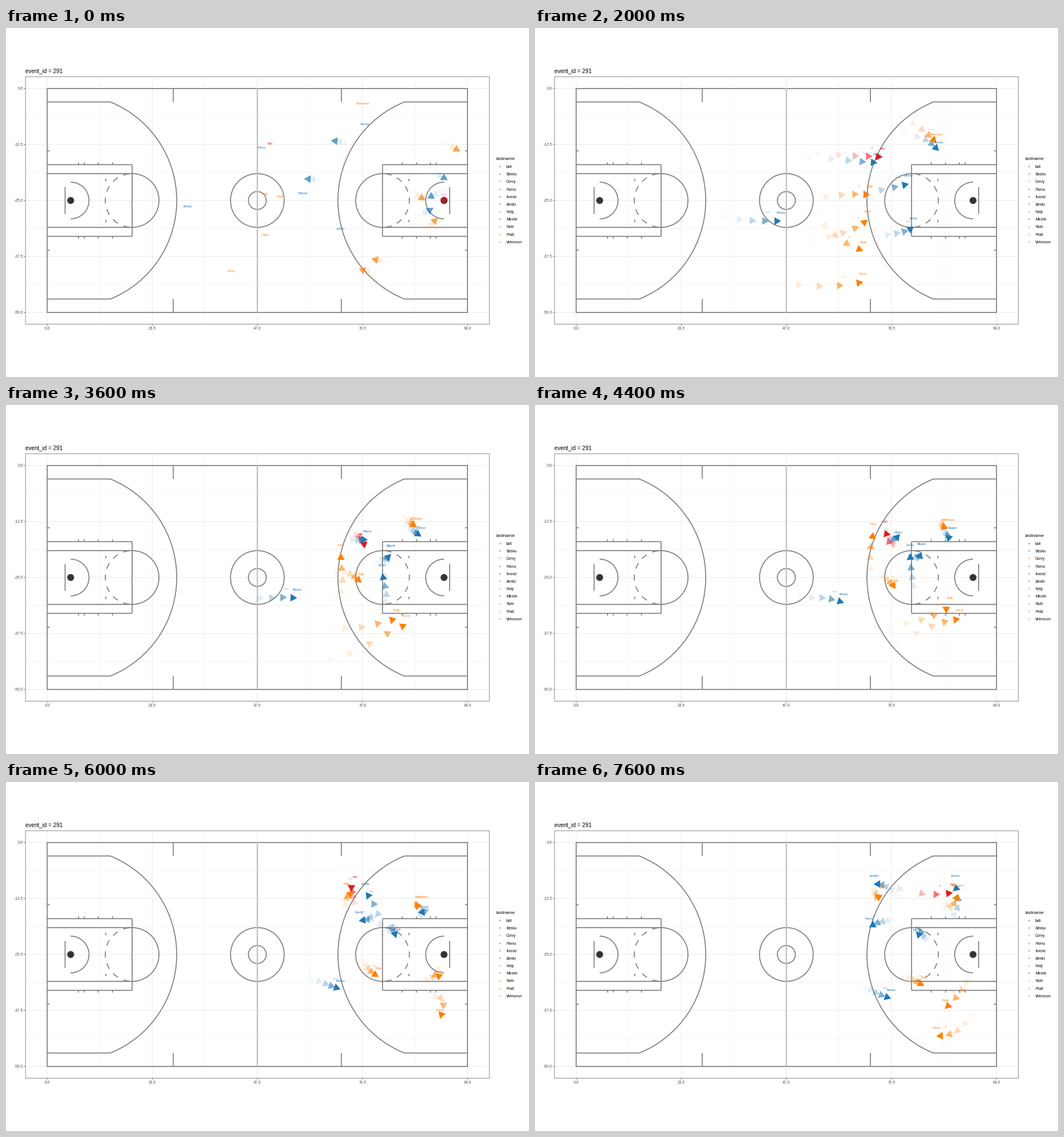
Animation of 917 by 611 pixels, one loop 8 s. Source, as a matplotlib script:

```python
import math

import matplotlib.pyplot as plt
import numpy as np
from matplotlib.animation import FuncAnimation
from matplotlib.patches import Arc, Circle, Polygon, Rectangle

W, H, DPI = 917, 611, 100
FRAMES, INTERVAL = 20, 400
WAKE = 6                      # frames until a trail has faded out
PT = 72 / DPI
BLUE, ORANGE, RED = "#1f78b4", "#ff7f00", "#e31a1c"
LINE = "#7f7f7f"
MID_X, MID_Y, FOOT = 440.7, 302, 7.84
LEFT = MID_X - 47 * FOOT

plt.rcParams["font.family"] = "Liberation Sans"
fig = plt.figure(figsize=(W / DPI, H / DPI), dpi=DPI, facecolor="white")
ax = fig.add_axes([0, 0, 1, 1])
ax.set_xlim(0, W)
ax.set_ylim(H, 0)
ax.axis("off")


def line(x0, y0, x1, y1, color=LINE, width=1.7, z=2):
    ax.plot([x0, x1], [y0, y1], color=color, lw=width * PT, zorder=z,
            solid_capstyle="butt", snap=False)


def text(x, y, s, size, color="black", ha="center", z=8, **kw):
    return ax.text(x, y, s, fontsize=size * PT, color=color, ha=ha,
                   va="baseline", zorder=z, **kw)


def arc(x, y, r, start, end):
    ax.add_patch(Arc((x, y), 2 * r, 2 * r, theta1=start, theta2=end,
                     color=LINE, lw=1.7 * PT, zorder=2))


def draw_axes():
    for i in range(9):
        x = LEFT + 11.75 * FOOT * i
        y = MID_Y + 6.25 * FOOT * (i - 4)
        width = 0.5 if i % 2 else 1
        line(x, 85, x, 518, "#ebebeb", width, 1)
        line(34, y, 847, y, "#ebebeb", width, 1)
        if i % 2 == 0:
            line(x, 518.5, x, 521.5, "#555555", 0.8)
            line(31, y, 34, y, "#555555", 0.8)
            text(x, 528, f"{11.75 * i:.1f}", 6.8, "#4d4d4d")
            label = f"{-6.25 * i:.1f}" if i else "0.0"
            text(30, y + 2.4, label, 6.8, "#4d4d4d", "right")
    ax.add_patch(Rectangle((34.2, 85.3), 813.2, 433.2, fill=False, ec=LINE,
                           lw=0.9 * PT, zorder=3, snap=False))
    text(33.5, 78.6, "event_id = 291", 9.9, ha="left")


def draw_half(side):
    """Draw one end of the court; side is -1 for left and 1 for right.

    Lengths are in feet: x from the baseline, y from the long axis.
    """
    def px(feet):
        return MID_X + side * (47 - feet) * FOOT

    def seg(x0, y0, x1, y1):
        line(px(x0), MID_Y + y0 * FOOT, px(x1), MID_Y + y1 * FOOT)

    def bow(x, r, spread=90, middle=0):
        middle += 180 if side > 0 else 0
        arc(px(x), MID_Y, r * FOOT, middle - spread, middle + spread)

    hoop, foul = 5.25, 19
    seg(0, -25, 0, 25)
    seg(foul, -8, foul, 8)
    seg(4, -3, 4, 3)
    for up in (-1, 1):
        seg(-0.1, 25 * up, 47, 25 * up)
        seg(0, 22 * up, 14.2, 22 * up)
        seg(0, 8 * up, foul, 8 * up)
        seg(0, 6 * up, foul, 6 * up)
        seg(28.2, 25 * up, 28.2, 22 * up)
        seg(0, 11.1 * up, 0.55, 11.1 * up)
        seg(13.1, 4.3 * up, 13.1, 4.85 * up)
        for x in (7, 8.3, 11.4, 14.6):
            seg(x, 8 * up, x, 8.5 * up)
    bow(hoop, 23.72, math.degrees(math.asin(22 / 23.72)))
    bow(hoop, 4.1)
    bow(foul, 6)
    for dash in range(-3, 4):
        bow(foul, 6, 6.5, 180 + 25.7 * dash)
    ax.add_patch(Circle((px(hoop), MID_Y), 5.6, fc="#333333", ec="#4a4a4a",
                        lw=0.8, zorder=2.5))


STEPS = np.array([0, 2, 5, 9, 13, 15, 17, 19])
players = []


def smooth_path(keys):
    """Cubic Hermite curve through the keys, sampled at every frame."""
    keys = np.array(keys, float)
    slopes = np.gradient(keys, STEPS, axis=0)
    t = np.arange(FRAMES)
    k = np.clip(np.searchsorted(STEPS, t, "right") - 1, 0, len(STEPS) - 2)
    span = (STEPS[k + 1] - STEPS[k])[:, None]
    u = (t - STEPS[k])[:, None] / span
    return (keys[k] * (1 + 2 * u) * (1 - u) ** 2
            + slopes[k] * span * u * (1 - u) ** 2
            + keys[k + 1] * u ** 2 * (3 - 2 * u)
            + slopes[k + 1] * span * u ** 2 * (u - 1))


def player(name, color, rest, heading, *keys):
    """rest, heading: place and angle before the run through the keys."""
    angle = math.radians(heading)
    drift = 8 * np.array([math.cos(angle), math.sin(angle)])
    players.append((name, color, np.array(rest), drift, smooth_path(keys)))


player("ball", RED, (768, 309), 90,
       (463, 217), (539, 223), (609, 226), (621, 241),
       (607, 193), (612, 181), (685, 197), (732, 194))
player("Besku", BLUE, (749, 315), -32,
       (318, 327), (365, 336), (431, 338), (510, 338),
       (567, 356), (586, 363), (604, 372), (624, 379))
player("Corvy", ORANGE, (619, 421), 202,
       (395, 440), (469, 451), (575, 445), (702, 384),
       (767, 383), (761, 414), (735, 440), (704, 445))
player("Farnu", BLUE, (570, 197), 186,
       (448, 224), (526, 230), (600, 236), (634, 236),
       (632, 241), (619, 243), (602, 246), (586, 254))
player("Ilvend", BLUE, (739, 298), 153,
       (629, 183), (677, 192), (708, 215), (728, 230),
       (734, 230), (734, 234), (743, 214), (737, 179))
player("Jandu", BLUE, (774, 266), 30,
       (587, 366), (625, 361), (664, 348), (660, 295),
       (650, 224), (631, 193), (609, 180), (594, 179))
player("Kolp", ORANGE, (641, 404), 192,
       (454, 305), (517, 294), (587, 292), (623, 311),
       (640, 332), (653, 341), (670, 350), (682, 357))
player("Mirzek", BLUE, (523, 264), 183,
       (521, 304), (587, 288), (655, 273), (675, 261),
       (679, 260), (684, 273), (675, 265), (671, 274))
player("Nulo", ORANGE, (757, 333), -40,
       (455, 377), (521, 364), (583, 336), (587, 260),
       (598, 197), (597, 193), (603, 200), (609, 198))
player("Pralt", ORANGE, (735, 301), 30,
       (480, 310), (513, 351), (575, 390), (684, 374),
       (755, 339), (758, 347), (745, 370), (719, 397))
player("Velmorun", ORANGE, (796, 216), 30,
       (626, 147), (669, 171), (704, 201), (720, 214),
       (727, 216), (729, 216), (734, 214), (742, 196))


def draw_legend():
    text(859.5, 230.6, "lastname", 8.2, ha="left")
    for i, (name, color, *_) in enumerate(players):
        y = 242.6 + 13.18 * i
        text(866.5, y + 1.5, "a", 5, color)
        text(877, y + 2.4, name, 6.7, ha="left")


def pose(rest, drift, path, step):
    """Tip and direction of the arrow; before the run it settles at rest."""
    if step < 0:
        return rest - max(0, -step - 2) * drift, drift
    return path[step], path[step] - path[step - 1]


def arrow(tip, direction, color, alpha, z, length=11.6):
    ahead = direction / (np.hypot(*direction) or 1)
    across = np.array([-ahead[1], ahead[0]]) * length / math.sqrt(3)
    tip = tip + 0.5 * ahead
    base = tip - length * ahead
    return ax.add_patch(Polygon([tip, base + across, base - across],
                                fc=color, ec="none", lw=0, alpha=alpha,
                                zorder=z))


moving = []


def reset():
    while moving:
        moving.pop().remove()
    return []


def draw(frame):
    reset()
    for age in range(WAKE - 1, -1, -1):
        fade = (1 - age / WAKE) ** 3
        step = frame - age
        for name, color, rest, drift, path in players:
            if step != 0:     # no direction is known at the first step
                tip, direction = pose(rest, drift, path, step)
                moving.append(arrow(tip, direction, color, fade,
                                    5 - age * 0.1))
            if step >= 0 and fade > 0.2:
                x, y = path[step]
                moving.append(text(x, y - 15 + 2 * fade, name, 5.6 * fade,
                                   color, z=7 - age * 0.1, alpha=fade))
    return moving


draw_axes()
draw_half(-1)
draw_half(1)
line(MID_X, 105, MID_X, 498, "#bebebe", 2.2, 2.2)
for feet in (6, 2):
    arc(MID_X, MID_Y, feet * FOOT, 0, 360)
draw_legend()

animation = FuncAnimation(fig, draw, frames=FRAMES, init_func=reset,
                          interval=INTERVAL, repeat=True, repeat_delay=0)
plt.show()
```
